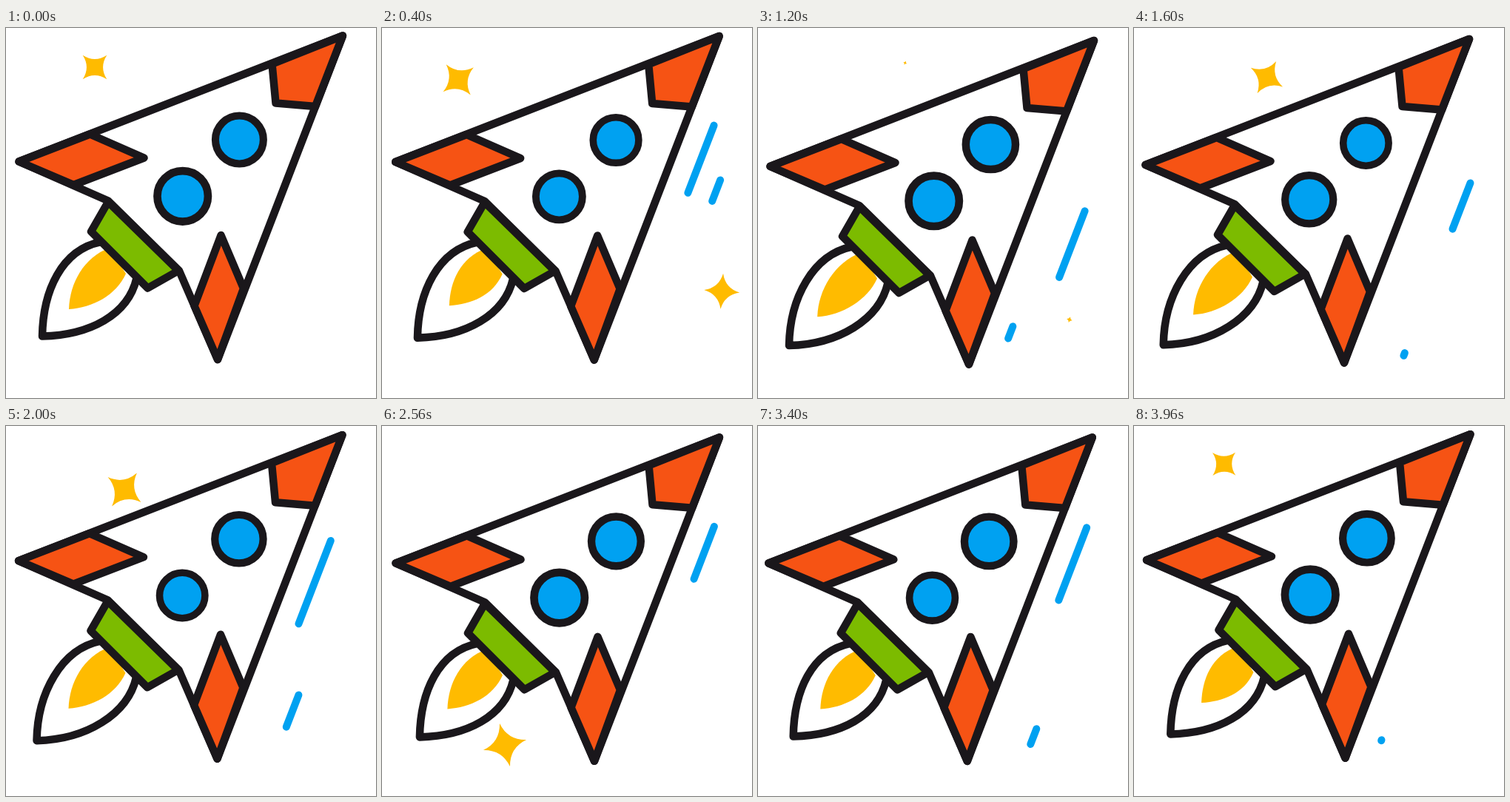
An HTML page for the animation above (4000 ms loop, 500 px wide and 500 px high).

```html
<!DOCTYPE html>
<html lang="en">
<head>
<meta charset="utf-8">
<title>Rocket</title>
<style>
  html, body { margin: 0; width: 100%; height: 100%; overflow: hidden; background: #fff; }
  svg { display: block; width: 100%; height: 100%; }
  .ink { stroke: #1a171b; stroke-width: 10.5; stroke-linecap: round; stroke-linejoin: round; fill: #fff; }
  .ink .fin { fill: #f65314; }
  .ink .nozzle { fill: #7cbb00; }
  .ink .window { fill: #00a1f1; stroke-width: 10.3; }
  .ink .glow, #stars { fill: #ffbb00; stroke: none; }
  #streaks { stroke: #00a1f1; stroke-width: 10; stroke-linecap: round; }
</style>
</head>
<body>
<svg viewBox="0 0 500 500">
  <g id="stars"></g>
  <g id="rocket">
    <g class="ink">
      <path id="flame"/>
      <path id="glow" class="glow"/>
      <path d="M455 10.5 17.5 180.5 138 233.5 234 328 286 448Z"/>
      <path class="fin" d="M455 10.5 359.5 48.5 364.5 101.5 418 106Z"/>
      <path class="fin" d="M17.5 180.5 113.5 143.5 186.5 175.5 91.5 212Z"/>
      <path class="fin" d="M290.5 280 321 352 286 448 254.5 375.5Z"/>
      <path class="nozzle" d="M138 235 115 275 191.5 351.5 233 328Z"/>
      <circle id="upper" class="window" r="33"/>
      <circle id="lower" class="window" r="33"/>
    </g>
    <g id="streaks"></g>
  </g>
</svg>
<script>
const LOOP = 4000, STEP = 40, PULSE = 4000 / 3;
const $ = id => document.getElementById(id);

// Smooth curve through [time, value] keys.
function track(keys, t) {
  const slope = i => {
    const a = keys[Math.max(i - 1, 0)], b = keys[Math.min(i + 1, keys.length - 1)];
    return (b[1] - a[1]) / (b[0] - a[0]);
  };
  let i = 0;
  while (i < keys.length - 2 && t >= keys[i + 1][0]) i++;
  const [t0, a] = keys[i], [t1, b] = keys[i + 1];
  const d = t1 - t0, k = (t - t0) / d, q = 1 - k;
  return a * q * q * (1 + 2 * k) + b * k * k * (3 - 2 * k)
    + d * k * q * (slope(i) * q - slope(i + 1) * k);
}

const drift = [
  [0, 0, 0], [560, 1, .9], [760, 1.7, 2.5], [1120, -.8, 6], [1200, -1, 6.5],
  [1680, -2, 4], [2000, -.5, 1.7], [2280, .3, 2.2], [2560, 1, 4.8],
  [3000, -2, 6.3], [3400, -3.2, 4.9], [3700, -2.5, 2.5], [3960, -.5, .7], [4000, 0, 0]
];
const driftX = drift.map(k => [k[0], k[1]]);
const driftY = drift.map(k => [k[0], k[2]]);
const flameReach = [[0, 0], [760, 3.4], [1200, 6], [2000, 7], [2560, -.9], [3400, -1.9], [3960, -.8], [4000, 0]];
const glowReach = [[0, 0], [760, -7.4], [1200, 3.8], [2000, 0], [2560, -2.4], [3400, -2.5], [3960, -6.6], [4000, 0]];

// Both streak lanes run parallel to the right edge of the hull.
const SLANT = .386;
const lanes = [
  { base: 498.5, top: 131, bottom: 425, starts: [44, 357, 1547, 2253, 3025] },
  { base: 535.6, top: 205, bottom: 441, starts: [192, 700, 1277, 2592] }
];

// peak: time of full size, span: half of the lifetime; x, y, turn hold at time `at`.
const stars = [
  { at: 0, x: 120, y: 53, turn: 45, peak: 290, span: 830, size: 27, speed: .042 },
  { at: 760, x: 442, y: 373, turn: 10, peak: 670, span: 575, size: 32.5, speed: .048 },
  { at: 2000, x: 160, y: 86, turn: 37, peak: 1850, span: 690, size: 29.8, speed: .0485 },
  { at: 2560, x: 166, y: 431, turn: -13.5, peak: 2750, span: 640, size: 33.5, speed: .047 }
];

function add(parent, tag, attrs = {}) {
  const el = document.createElementNS(parent.namespaceURI, tag);
  for (const name in attrs) el.setAttribute(name, attrs[name]);
  return parent.appendChild(el);
}

const starShape = "M1 0Q.18 .18 0 1Q-.18 .18 -1 0Q-.18 -.18 0 -1Q.18 -.18 1 0Z";
for (const star of stars) star.el = add($("stars"), "path", { d: starShape });
const streaks = lanes.flatMap(lane =>
  lane.starts.map(start => ({ ...lane, start, el: add($("streaks"), "line") })));

const ease = k => {
  k = Math.min(1, Math.max(0, k));
  return k * k * (3 - 2 * k);
};

function drawStar(star, t) {
  let age = t - star.peak;
  if (age > LOOP / 2) age -= LOOP;
  const visible = Math.abs(age) < star.span;
  star.el.style.display = visible ? "" : "none";
  if (!visible) return;
  const dt = age + star.peak - star.at, shift = dt * star.speed;
  const size = star.size * Math.cos(Math.PI / 2 * age / star.span);
  star.el.setAttribute("transform",
    `translate(${star.x - shift} ${star.y + shift}) rotate(${star.turn + dt * .016}) scale(${size})`);
}

function drawStreak(s, t) {
  const age = t - s.start;
  const visible = age > 60 && age < 945;
  s.el.style.display = visible ? "" : "none";
  if (!visible) return;
  const y = k => s.top + (s.bottom - s.top) * k;
  const y1 = y(ease((age - 350) / 610)), y2 = y(ease(age / 960));
  const ends = { x1: s.base - SLANT * y1, y1, x2: s.base - SLANT * y2, y2 };
  for (const name in ends) s.el.setAttribute(name, ends[name]);
}

function drawWindow(el, x, y, radius, swing, phase, t) {
  const r = radius + swing * Math.cos(2 * Math.PI * (t / PULSE - phase));
  el.setAttribute("transform", `translate(${x} ${y}) scale(${r / 38})`);
}

function draw(t) {
  $("rocket").setAttribute("transform", `translate(${track(driftX, t)} ${track(driftY, t)})`);

  const f = track(flameReach, t), g = track(glowReach, t);
  $("flame").setAttribute("d",
    `M128 289C75 300 ${50 - f} ${355 + f * .6} ${49 - f} ${416.5 + f}
     C${113 - f * .6} ${415 + f} 165 388 176.5 338`);
  $("glow").setAttribute("d",
    `M140 297C105 310 ${86 - g} ${345 + g * .6} ${85 - g} ${380 + g}
     C${117 - g * .6} ${378 + g} 149 361 162 332Z`);

  drawWindow($("upper"), 315.4, 151, 37.5, 2.2, .74, t);
  drawWindow($("lower"), 238.7, 227.3, 37.4, 2.1, .96, t);
  stars.forEach(star => drawStar(star, t));
  streaks.forEach(streak => drawStreak(streak, t));
}

const begin = performance.now();
function tick() {
  const t = Math.max(0, performance.now() - begin) % LOOP;
  draw(Math.floor(t / STEP) * STEP);
  requestAnimationFrame(tick);
}
tick();
</script>
</body>
</html>
```
